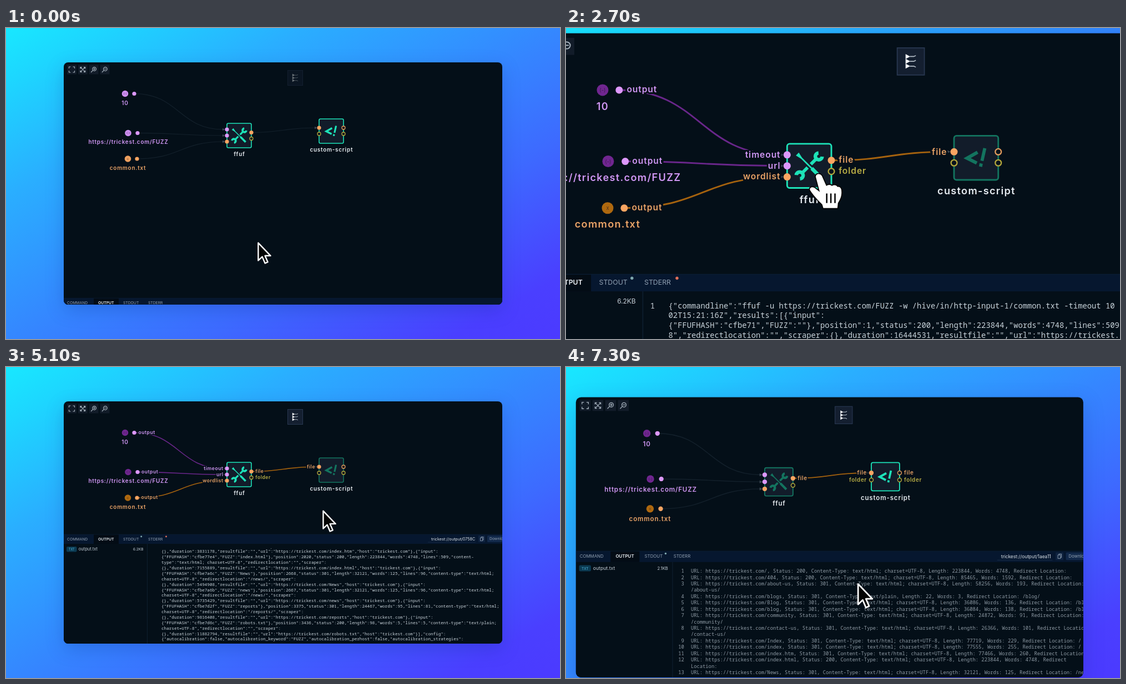
These frames come from a looping animation (998 by 561 pixels, 7400 ms). An HTML page:

```html
<!DOCTYPE html>
<html lang="en">
<head>
<meta charset="utf-8">
<title>Workflow editor demo</title>
<style>
html, body { margin: 0; width: 100%; height: 100%; overflow: hidden; }
body { background: linear-gradient(to bottom right, #18e8ff 0%, #1dd6ff 9%, #2aaeff 27%, #3489ff 49%, #3d6aff 68%, #4a3fff 90%, #4b3aff 100%); }
svg { display: block; width: 100vw; height: 100vh; }
text { font-family: Inter, "Noto Sans", sans-serif; }
.shell { fill: #040f18; filter: drop-shadow(0 10px 16px rgba(0, 25, 120, .2)); }
.name { font-size: 10px; font-weight: 600; letter-spacing: .72px; text-anchor: middle; fill: #e6ebf0; }
.port { font-size: 8.6px; font-weight: 600; letter-spacing: .52px; stroke: #040f18; stroke-width: 3.4px; paint-order: stroke; }
.end { text-anchor: end; }
.small { font-size: 6.8px; fill: #91a0b2; }
.code text { font: 7.63px "Noto Sans Mono", "DejaVu Sans Mono", monospace; fill: #c9d3da; white-space: pre; }
#result2 .code text { fill: #909ca6; }
text.pink { fill: #d097f4; }
text.orange { fill: #eaa367; }
text.yellow { fill: #b9ae45; }
.dot.pink { fill: #dd98fc; }
.dot.orange { fill: #f9a562; }
.ring { fill: #08131c; stroke-width: 1.3; }
.ring.orange { stroke: #e09a5c; }
.ring.yellow { stroke: #b2a53b; }
.link { fill: none; stroke: #13202b; stroke-width: 1.2; }
.bead.pink { fill: #cf8ff2; }
.bead.orange { fill: #efa05f; }
.node { color: #1de2b8; }
[data-state="1"] .custom, [data-state="2"] .ffuf { color: #13745f; }
[data-state="1"] .bead.pink, [data-state="2"] .bead.pink { fill: #702690; }
[data-state="1"] .bead.orange, [data-state="2"] .bead.orange { fill: #ae680f; }
[data-state="1"] .link { stroke-width: 1.6; }
[data-state="1"] .link.pink { stroke: #69268a; }
[data-state="1"] .link.orange, [data-state="2"] .link.file { stroke: #a5620e; stroke-width: 1.6; }
.in1, .in2 { display: none; }
[data-state="1"] .in1, [data-state="2"] .in2 { display: inline; }
</style>
</head>
<body>
<svg id="stage" viewBox="0 0 998 561" data-state="0">
  <defs>
    <clipPath id="window"><rect x="104" y="62" width="790" height="437" rx="8"/></clipPath>
    <clipPath id="viewer"><rect x="255" y="327" width="639" height="172"/></clipPath>
    <clipPath id="address"><rect x="760" y="302" width="85.5" height="17"/></clipPath>
  </defs>
  <g id="camera">
    <rect class="shell" x="104" y="62" width="790" height="437" rx="8"/>
    <g clip-path="url(#window)">
      <g id="tools" fill="none" stroke="#a4b0bb" stroke-width="1.1"></g>
      <g id="palette" transform="translate(521 90)">
        <rect x="-13.5" y="-13.5" width="27" height="27" fill="#141f30" stroke="#283750"/>
        <path d="M-5.2-7.4v5l4.6-2.5zM-5.2-2.6v5l4.6-2.5zM-5.2 2.2v5l4.6-2.5z" fill="#f2f5f8"/>
        <path d="M-1-4.9H3l2-1M-1-.1H3l2-1M-1 4.7H3l2 1" fill="none" stroke="#b4bec8" stroke-width=".9"/>
      </g>
      <g id="graph"></g>
      <g id="drawer"></g>
    </g>
    <g id="cursor" stroke-linejoin="round">
      <path id="arrow" d="M1.4 2.6V34.4L8.6 27.6 13.6 39.4 18.6 37.2 13.6 25.8H23.6Z" fill="#050505" stroke="#fff" stroke-width="2.4"/>
      <g id="hand">
        <path d="M-2 2C-2-1 2-2 4 1L8.5 11C10 9.5 13 9.5 14 11 16 9.8 18.5 10 19.5 12 22 11.5 23.5 13.5 23.5 16 24 21 22 25 20 28L19.5 33H5.5L4.5 29.5C1 26-4 21-7.5 15.5-9 12.5-5 11-2.5 13.5L2 17Z" fill="#fff" stroke="#050505" stroke-width="2" paint-order="stroke"/>
        <path d="M8.9 18.5V28M13 18.5V28M17.1 18.5V28" stroke="#050505" stroke-width="1.4"/>
      </g>
    </g>
  </g>
</svg>
<script>
const $ = id => document.getElementById(id);
const label = (x, y, text, cls) => `<text x="${x}" y="${y}" class="${cls}">${text}</text>`;
const port = (x, y, color, kind = 'dot') =>
  `<circle cx="${x}" cy="${y}" r="${kind === 'dot' ? 3.6 : 3}" class="${kind} ${color}"/>`;
const link = (x1, y1, x2, y2, cls) => {
  const mid = (x1 + x2) / 2;
  return `<path class="link ${cls}" d="M${x1} ${y1}C${mid} ${y1} ${mid} ${y2} ${x2} ${y2}"/>
    <path d="M${x2 - 2} ${y2 - 2.2}l4.4 2.2-4.4 2.2z" fill="#3c4854"/>`;
};
const bead = (x, y, color, glyph) => `<circle cx="${x}" cy="${y}" r="5.8" class="bead ${color}"/>
  <text x="${x}" y="${y + 1.9}" font-size="5.2" text-anchor="middle" fill="#1c1426" opacity=".65">${glyph}</text>`;
const node = (cls, x, y, icon) => `<g class="node ${cls}" transform="translate(${x} ${y})">
  <rect x="-22" y="-22" width="44" height="44" rx="2.5" fill="#121c2a" stroke="currentColor" stroke-width="1.6"/>${icon}</g>`;

function drawTools() {
  const icons = [
    'M-5-2V-5H-2M2-5H5V-2M5 2V5H2M-2 5H-5V2',
    'M-4-4 4 4M4-4-4 4M-4.4-1.6V-4.4H-1.6M1.6-4.4H4.4V-1.6M4.4 1.6V4.4H1.6M-1.6 4.4H-4.4V1.6',
    'M-1.6 1.4-5 5M-1-1H3M1-3V1M4.4-1a3.4 3.4 0 1 0-6.8 0a3.4 3.4 0 1 0 6.8 0',
    'M-1.6 1.4-5 5M-1-1H3M4.4-1a3.4 3.4 0 1 0-6.8 0a3.4 3.4 0 1 0 6.8 0'];
  $('tools').innerHTML = icons.map((d, i) => `<g transform="translate(${118.5 + 19.8 * i} 75)">
    <rect x="-8.5" y="-8.5" width="17" height="17" fill="#121c29" stroke="none"/><path d="${d}"/></g>`).join('');
}

function drawGraph() {
  const wrench = `<g fill="none" stroke="currentColor">
    <g transform="rotate(-45)"><path d="M-9 0H9" stroke-width="3.2"/>
      <path d="M15.6-2.6A3.4 3.4 0 1 0 15.6 2.6M-15.6-2.6A3.4 3.4 0 1 1-15.6 2.6" stroke-width="3.6"/></g>
    <g transform="rotate(45)"><path d="M-11 0H15" stroke="#121c2a" stroke-width="4.6"/>
      <path d="M-15.5 0H4" stroke-width="1.5"/><path d="M-16-1.2V1.2L-11 0Z" stroke-width="1.4"/>
      <path d="M3.5 0H16.5" stroke-width="3.6"/></g></g>`;
  const bang = `<g fill="none" stroke="currentColor">
    <path d="M1.4-5.6-9 .3 .6 5.2" stroke-width="3.4"/>
    <path d="M8.6-9.5 5.8 3M5 5.6 4.4 8.8" stroke-width="3.2"/></g>`;
  $('graph').innerHTML = [
    link(231, 118.5, 392, 183, 'pink'), link(237, 189.5, 392, 194, 'pink'),
    link(236, 236, 392, 205, 'orange'), link(442, 188.5, 558, 180, 'orange file'),
    bead(214.5, 118.5, 'pink', '(-)'), bead(220, 189.5, 'pink', '(-)'), bead(219.5, 236, 'orange', 'x'),
    port(231, 118.5, 'pink'), port(237, 189.5, 'pink'), port(236, 236, 'orange'),
    label(214.5, 138.5, '10', 'name pink'),
    label(220.5, 209.2, 'https://trickest.com/FUZZ', 'name pink'),
    label(219.5, 255.6, 'common.txt', 'name orange'),
    node('ffuf', 420, 194, wrench), node('custom', 586, 186, bang),
    label(420.5, 231, 'ffuf', 'name'), label(586.3, 222.6, 'custom-script', 'name'),
    label(238.5, 120.8, 'output', 'port pink in1'), label(244, 191.8, 'output', 'port pink in1'),
    label(243.5, 238.3, 'output', 'port orange in1'),
    label(391.5, 185.8, 'timeout', 'port pink end in1'), label(391.5, 196.7, 'url', 'port pink end in1'),
    label(391.5, 207.6, 'wordlist', 'port orange end in1'),
    label(449.3, 191, 'file', 'port orange in1'), label(449.3, 202, 'folder', 'port yellow in1'),
    label(557, 183, 'file', 'port orange end in1'),
    label(449.3, 191, 'file', 'port orange in2'),
    label(557, 183, 'file', 'port orange end in2'), label(557, 194, 'folder', 'port yellow end in2'),
    label(615, 183, 'file', 'port orange in2'), label(615, 194, 'folder', 'port yellow in2'),
    port(398, 183, 'pink'), port(398, 194, 'pink'), port(398, 205, 'orange'),
    port(442, 188.5, 'orange'), port(442, 199.5, 'yellow', 'ring'),
    port(564, 180, 'orange'), port(564, 191, 'yellow', 'ring'),
    port(608, 180, 'orange', 'ring'), port(608, 191, 'yellow', 'ring')
  ].join('');
}

// hash | word | position | status | length | words | lines | type | location | duration
const hits = `1||1|200|223844|4748|509|html||16444531
ca|404|202|200|85465|1592|267|html||15171036
e3|about-us|227|301|58256|193|197|html|/about-us/|17022971
290|blogs|656|301|22|3|2|bare|/blog/|22012132
287|Blog|647|301|36086|136|111|html|/blog/|38758236
286|blog|646|301|36084|138|100|html|/blog/|30912447
3c1|community|961|301|24872|91|81|html|/community/|9120386
3e0|contact-us|992|301|26366|101|88|html|/contact-us/|8402175
7e1|Index|2017|301|77719|229|204|html|/|6120938
7e2|index|2018|301|77555|255|204|html|/|5230417
7e3|index.htm|2019|301|77466|260|204|html|/|3831178
7e4|index.html|2020|200|223844|4748|509|html||7155889
a6c|News|2668|301|32121|125|96|html|/news/|5494908
a6b|news|2667|301|32121|125|96|html|/news/|5735429
d2f|reports|3375|301|24467|95|81|html|/reports/|9816408
d6c|robots.txt|3436|200|98|5|5|plain||11882794`.split('\n').map(row => {
  const [hash, word, position, status, length, words, lines, kind, location, duration] = row.split('|');
  const type = kind === 'bare' ? 'text/plain' : `text/${kind}; charset=UTF-8`;
  return { hash, word, position, status, length, words, lines, type, location, duration };
});

function wrap(text, limit) {
  const lines = [''];
  for (const part of text.split(/(?<=[ -])|(?=\{)/)) {
    const last = lines[lines.length - 1];
    if (last && (last + part).trimEnd().length > limit) lines.push(part);
    else lines[lines.length - 1] = last + part;
  }
  return lines;
}

const toJson = h => `{"input":{"FFUFHASH":"cfbe7${h.hash}","FUZZ":"${h.word}"},"position":${h.position},` +
  `"status":${h.status},"length":${h.length},"words":${h.words},"lines":${h.lines},"content-type":"${h.type}",` +
  `"redirectlocation":"${h.location}","scraper":{},"duration":${h.duration},"resultfile":"",` +
  `"url":"https://trickest.com/${h.word}","host":"trickest.com"}`;
const toLine = h => `URL: https://trickest.com/${h.word}, Status: ${h.status}, Content-Type: ${h.type}, ` +
  `Length: ${h.length}, Words: ${h.words}, Redirect Location: ${h.location}`;

const LINE = 9.87, FIRST = 335.8;
const codeLine = (x, row, text, cls = '') => label(x, FIRST + row * LINE, text, cls);

function jsonCode() {
  const json = '{"commandline":"ffuf -u https://trickest.com/FUZZ -w /hive/in/http-input-1/common.txt -timeout 10 ' +
    '-o /hive/out/output.txt","time":"2023-11-02T15:21:16Z","results":[' + hits.map(toJson).join(',') +
    '],"config":{"autocalibration":false,"autocalibration_keyword":"FUZZ","autocalibration_perhost":false,' +
    '"autocalibration_strategies":';
  return codeLine(266.5, 0, '1', 'end') + wrap(json, 139).map((s, i) => codeLine(280, i, s)).join('');
}

function listCode() {
  let row = 0;
  return hits.slice(0, 13).map((hit, i) => codeLine(272.5, row, i + 1, 'end') +
    wrap(toLine(hit), 137).map(s => codeLine(283, row++, s)).join('')).join('');
}

const result = (id, size, address, code) => `<g id="${id}">
  <path d="M254.5 319V499" stroke="#0e1e2e"/>
  <rect x="109" y="324" width="18.5" height="9.5" rx="2" fill="#0b3a52"/>
  <text x="118.2" y="331" font-size="5.6" text-anchor="middle" fill="#4fb4d8">TXT</text>
  <text x="130.8" y="331.4" font-size="7.5" fill="#c6d0d9">output.txt</text>
  <text x="247.5" y="331.2" font-size="6.6" fill="#c6d0d9" class="end">${size}</text>
  <path d="M760 316H846" stroke="#1b2f4a" stroke-width=".8"/>
  <text x="766" y="312.8" font-size="7.2" fill="#dfe6ec" clip-path="url(#address)">${address}</text>
  <rect x="851" y="304" width="12" height="12" fill="#0f2340"/>
  <path d="M854.5 308V313.5H858.5V308ZM856 308V306.5H860V312H858.5" fill="none" stroke="#93a3b5" stroke-width=".8"/>
  <rect x="867" y="304" width="40" height="12" rx="1.5" fill="#12294a"/>
  <text x="871" y="312.4" class="small">Download</text>
  <g clip-path="url(#viewer)"><g class="code">${code}</g></g></g>`;

function drawDrawer() {
  const spokes = Array.from({ length: 8 }, (_, i) =>
    `<circle cx="3.4" r=".75" fill="#a9b4be" opacity="${.35 + i * .09}" transform="rotate(${i * 45})"/>`).join('');
  $('drawer').innerHTML = `<rect x="104" y="302" width="790" height="200" fill="#040f18"/>
    <rect x="104" y="302" width="790" height="17" fill="#06172f"/>
    <rect x="158" y="302" width="45" height="17" fill="#030c15"/>
    <path d="M104 302H894" stroke="#0d2038" stroke-width=".6"/>
    ${label(110, 312.5, 'COMMAND', 'small')}
    <text x="166" y="312.5" font-size="6.8" font-weight="600" fill="#eef2f6">OUTPUT</text>
    ${label(211, 312.5, 'STDOUT', 'small')}${label(256, 312.5, 'STDERR', 'small')}
    <circle id="outMark" cx="243.7" cy="305.8" r="1.5" fill="#7fa8ae"/>
    <circle id="errMark" cx="288.5" cy="305.8" r="1.5" fill="#e0705a"/>
    <g id="loader">${spokes}</g>
    ${result('result1', '6.2KB', 'trickest://output/0758C', jsonCode())}
    ${result('result2', '2.1KB', 'trickest://output/1aea11', listCode())}`;
}

const LOOP = 7400, STEP = 100;
const clamp = v => Math.min(1, Math.max(0, v));
const ease = v => { v = clamp(v); return v * v * (3 - 2 * v); };
const spring = ms => { const x = Math.max(0, ms) * .008; return 1 - (1 + x) * Math.exp(-x); };
const show = (id, on) => { $(id).style.display = on ? '' : 'none'; };

const zooms = [
  { start: 1350, end: 2601, x: 397.6, y: 126.6 },
  { start: 5853, end: 6886, x: 653, y: 110.2 }];
const path = [[0, 453, 385], [250, 453, 385], [1150, 430, 211], [1250, 430, 211], [1450, 428.8, 203],
  [2850, 428.5, 203], [3750, 580, 372], [4650, 539, 372], [4750, 539, 372], [5325, 586, 198],
  [6500, 586, 198], [7250, 542, 350.6], [LOOP, 542, 350.6]];

function cursorAt(t) {
  const i = path.findIndex((p, k) => k && t <= p[0]);
  const [t0, x0, y0] = path[i - 1], [t1, x1, y1] = path[i];
  const k = ease((t - t0) / (t1 - t0));
  return [x0 + (x1 - x0) * k, y0 + (y1 - y0) * k];
}

function render(t) {
  const zoom = t < 5000 ? zooms[0] : zooms[1];
  const scale = 1 + spring(t - zoom.start) - spring(t - zoom.end);
  $('camera').setAttribute('transform',
    `translate(${zoom.x * (1 - scale)} ${zoom.y * (1 - scale)}) scale(${scale})`);

  $('stage').dataset.state = t < 1100 ? 0 : t < 5700 ? 1 : 2;
  $('palette').setAttribute('opacity', .42 + .58 * clamp((t - 1250) / 200));

  $('drawer').setAttribute('transform', `translate(0 ${185.3 * (1 - ease((t - 1200) / 300))})`);
  const loading = t >= 1300 && t < 2450 || t >= 5700 && t < 6700;
  show('loader', loading);
  $('loader').setAttribute('transform', `translate(201 332) rotate(${t * .36})`);
  show('outMark', t >= 1500);
  show('errMark', t >= 1500 && t < 5700);
  show('result1', t >= 2450 && t < 5700);
  show('result2', t >= 6700);
  const scroll = (33 * LINE + .3) * ease((t - 3750) / 900);
  document.querySelector('#result1 .code').setAttribute('transform', `translate(0 ${-scroll})`);

  const [x, y] = cursorAt(t);
  const press = Math.max(1 - Math.abs(t - 1200) / 200, 1 - Math.abs(t - 5650) / 200, 0);
  $('cursor').setAttribute('transform', `translate(${x} ${y}) scale(${1 - .1 * press})`);
  const pointing = y < 216 && (x > 398 && x < 442 || x > 564 && x < 608);
  show('hand', pointing);
  show('arrow', !pointing);
}

drawTools();
drawGraph();
drawDrawer();
const began = performance.now();
function tick() {
  const t = (performance.now() - began) % LOOP;
  render(Math.floor(t / STEP) * STEP);
  requestAnimationFrame(tick);
}
tick();
</script>
</body>
</html>
```
